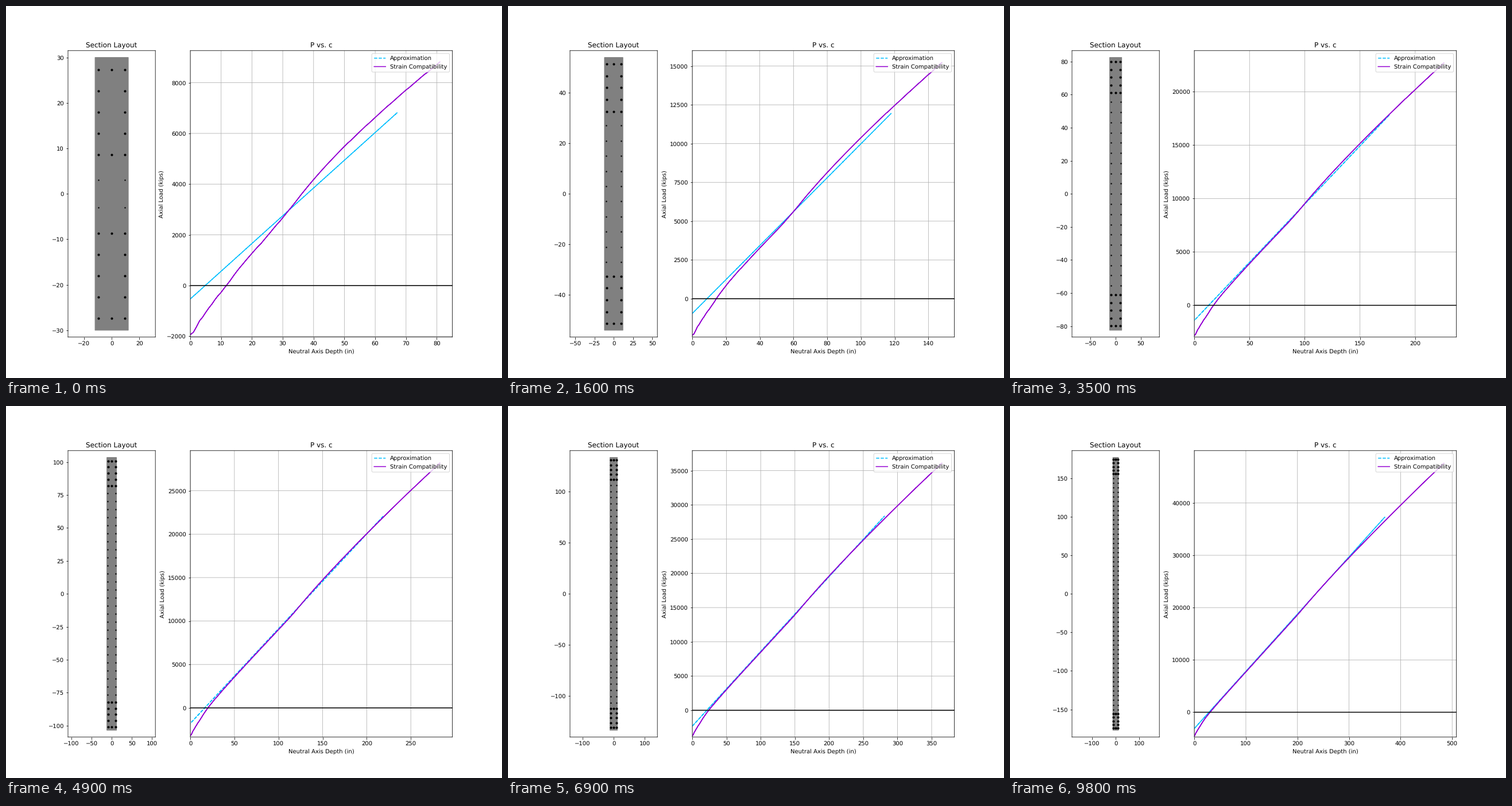
Recreate the animation shown at these times as a matplotlib script. Size 864 by 648 pixels, loop 9900 ms.

```python
import matplotlib.pyplot as plt
import numpy as np
from matplotlib.animation import FuncAnimation
from matplotlib.patches import Rectangle

FRAMES, INTERVAL = 99, 100

# Section data (kips, inches)
WIDTH, ZONE, COVER = 24, 24, 2.0
FC, FY, ES, EPS_CU, BETA = 6, 60, 29000, 0.003, 0.75
BIG_AREA, BIG_DIA = 1.27, 1.27
WEB_AREA, WEB_DIA = 0.44, 0.75

# Extent of both curves at a few wall lengths
LENGTHS = [60, 108, 165, 207, 267, 315, 354]
DEPTH_MAX = [81, 148, 226, 283, 365, 431, 484]
APPROX_END = [67.1, 117.9, 176.9, 219.2, 281.0, 330.1, 369.3]

# Soft edges: shapes and glyphs keep their fractional positions
plt.rcParams.update({"path.snap": False, "text.hinting": "none"})


def at_length(values, length):
    return np.interp(length, LENGTHS, values)


def there_and_back(values):
    return np.concatenate([values, values[-2::-1]])


def layout(length):
    """Return end-zone bars, web bars as (x, y) arrays."""
    edge = COVER + BIG_DIA / 2
    x = WIDTH / 2 - edge
    rows = np.linspace(length / 2 - edge, length / 2 - ZONE + edge, 5)
    zone = [(sx * x, y) for y in rows for sx in (-1, 1)]
    zone += [(0, rows[0]), (0, rows[-1])]
    zone = np.array(zone)
    big = np.vstack([zone, zone * [1, -1]])

    web_len = length - 2 * ZONE
    count = int(web_len // 6)
    x = WIDTH / 2 - COVER - WEB_DIA / 2
    ys = np.linspace(web_len / 2 - 3, 3 - web_len / 2, count)
    web = np.array([(sx * x, y) for y in ys for sx in (-1, 1)])
    return big, web


def axial_load(c, length, big, web):
    """Axial load for each neutral axis depth by strain compatibility."""
    depth = length / 2 - np.concatenate([big[:, 1], web[:, 1]])
    area = np.repeat([BIG_AREA, WEB_AREA], [len(big), len(web)])
    c = np.maximum(c, 1e-6)[:, None]
    stress = np.clip(ES * EPS_CU * (c - depth) / c, -FY, FY)
    stress = stress - 0.85 * FC * (depth < BETA * c)
    concrete = 0.85 * FC * WIDTH * BETA * c[:, 0]
    return concrete + stress @ area


fig, (sec, ax) = plt.subplots(
    1, 2, figsize=(12, 9), dpi=72, gridspec_kw={"width_ratios": [1, 3]})

sec.set_title("Section Layout")
wall = sec.add_patch(Rectangle((0, 0), 1, 1, color="gray"))
big_dots = sec.scatter([], [], s=17, color="black", linewidths=0, zorder=3)
web_dots = sec.scatter([], [], s=6, color="black", linewidths=0, zorder=3)

ax.set_title("P vs. c")
ax.set_xlabel("Neutral Axis Depth (in)")
ax.set_ylabel("Axial Load (kips)")
ax.grid(True)
approx, = ax.plot([], [], "--", color="deepskyblue", label="Approximation")
exact, = ax.plot([], [], color="darkviolet", label="Strain Compatibility")
ax.axhline(0, color="black")
ax.legend(loc="upper right")


def update(frame):
    length = 60 + 3 * frame
    big, web = layout(length)

    wall.set_bounds(-WIDTH / 2, -length / 2, WIDTH, length)
    big_dots.set_offsets(big)
    web_dots.set_offsets(web)
    half = 1.05 * length / 2
    sec.set_xlim(-half, half)
    sec.set_ylim(-half, half)

    # Both curves are traced for each bending direction, so they double back
    c = np.arange(int(round(at_length(DEPTH_MAX, length))) + 1)
    load = axial_load(c, length, big, web)
    exact.set_data(there_and_back(c), there_and_back(load))

    # Uniform web steel gives a straight line, starting at pure tension
    steel = len(web) * WEB_AREA * FY / (length - 2 * ZONE)
    slope = 0.85 * FC * WIDTH * BETA + 2 * steel
    start = (load[0] + steel * length) / slope
    ends = there_and_back(np.array([start, at_length(APPROX_END, length)]))
    approx.set_data(ends, slope * ends - steel * length)

    ax.set_xlim(0, 1.05 * c[-1])
    ax.set_ylim(1.05 * load.min(), 1.05 * load.max())
    return wall, big_dots, web_dots, approx, exact


anim = FuncAnimation(fig, update, frames=FRAMES, interval=INTERVAL,
                     repeat=True, repeat_delay=0, blit=False)
plt.show()
```
